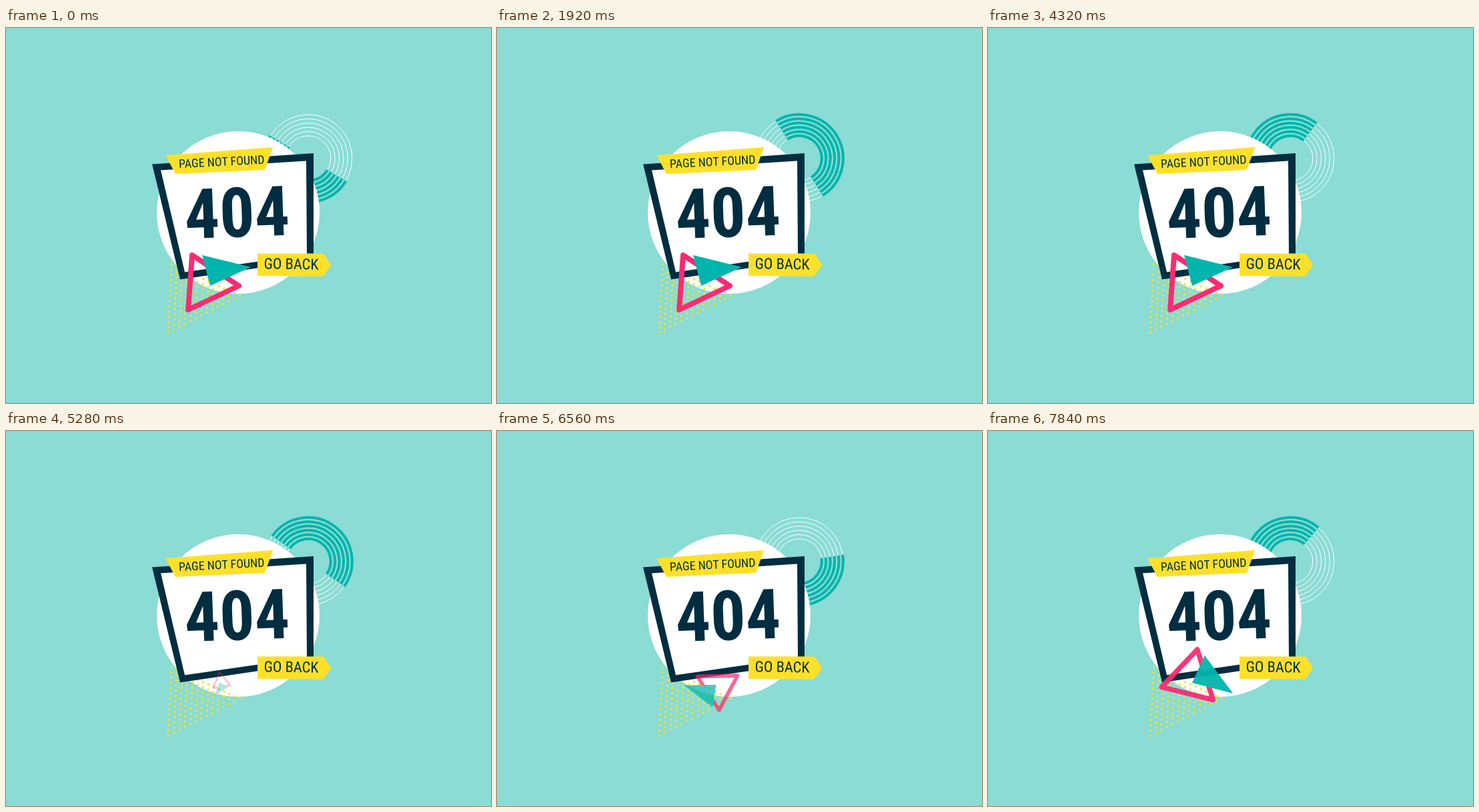
Recreate the animation shown at these times as an HTML page. Size 727x563 px, loop 8 s.

```html
<!DOCTYPE html>
<html lang="en">
<head>
<meta charset="utf-8">
<title>Page not found</title>
<style>
  html, body { margin: 0; width: 100%; height: 100%; overflow: hidden; background: #8adcd5; }
  svg { display: block; width: 727px; height: 563px; }
  text { font-family: "Roboto Condensed", Roboto, sans-serif; font-stretch: 75%; text-anchor: middle; fill: #002d40; }
</style>
</head>
<body>
<svg viewBox="0 0 727 563">
  <g transform="translate(453 195.7)" fill="none">
    <g id="rings" stroke="#fff"></g>
    <g id="arcs" stroke="#00b5ad" stroke-width="4"></g>
  </g>
  <circle cx="348" cy="277" r="122" fill="#fff"/>
  <g id="dots" fill="#ffe028"></g>

  <path fill="#002d40" d="M219 204.5 461 188V348L261 377.500Z"/>
  <path fill="#fff" d="M232 213.500 450 199.500 451 340 268 366.500Z"/>
  <path fill="#ffe028" d="M239 191 400 179 388 213 254 219Z"/>
  <path fill="#ffe028" d="M377 338.500H476L487.500 356 475 373 377 372Z"/>

  <text transform="translate(323.500 207) rotate(-3)" font-size="18">PAGE NOT FOUND</text>
  <text transform="translate(347.500 313.500) rotate(-2)" font-size="104" font-weight="700">404</text>
  <text transform="translate(427.500 362) rotate(.8)" font-size="22.5">GO BACK</text>

  <g id="triangles">
    <path d="M279 341 349 387 273 423Z" fill="none" stroke="#fb2b73" stroke-width="8" stroke-linejoin="round"/>
    <path d="M294 341 367 359 306 387Z" fill="#00b5ad"/>
  </g>
</svg>
<script>
const LOOP = 8000, STEP = 160;
const PIVOT = [318.6, 381.2];
const GROW_START = 4553, GROW_TIME = 4290;
// [time, angle] points of the spinning half rings, including one short stall
const SPIN = [[0, 31], [1920, 238], [2560, 307], [2720, 307], [2880, 343],
  [4320, 487], [5280, 575], [6560, 711.5], [7840, 850]];

const byId = id => document.getElementById(id);

function addCircle(parent, attrs) {
  const el = document.createElementNS("http://www.w3.org/2000/svg", "circle");
  for (const key in attrs) el.setAttribute(key, attrs[key]);
  byId(parent).append(el);
}

for (let i = 0; i < 6; i++) {
  const r = 65.8 - i * 6.4;
  addCircle("rings", { r });
  addCircle("arcs", { r, pathLength: 2, "stroke-dasharray": "1 1" });
}

// Triangular lattice: rows widen from the top corner to the slanted base
const ROWS = 13;
for (let i = 0; i <= ROWS; i++) {
  for (let j = 0; j <= i; j++) {
    addCircle("dots", {
      cx: 248.5 + (-5.5 * i + 107.5 * j) / ROWS,
      cy: 355 + (102 * i - 55 * j) / ROWS,
      r: 1.7
    });
  }
}

function spinAt(t) {
  const k = SPIN.findIndex(p => p[0] > t);
  const [t0, a0] = SPIN[k < 0 ? SPIN.length - 1 : k - 1];
  if (k < 0) return a0;
  const [t1, a1] = SPIN[k];
  return a0 + (a1 - a0) * (t - t0) / (t1 - t0);
}

function growAt(t) {
  if (t < GROW_START) return 1;
  const left = 1 - (t - GROW_START) / GROW_TIME;
  return 1 - left * left;
}

function draw(now) {
  const t = Math.floor(now % LOOP / STEP) * STEP;
  const s = growAt(t), [x, y] = PIVOT;
  byId("arcs").setAttribute("transform", `rotate(${spinAt(t)})`);
  byId("triangles").setAttribute("transform",
    `translate(${x} ${y}) rotate(${720 * (1 - s)}) scale(${s}) translate(${-x} ${-y})`);
  byId("triangles").setAttribute("opacity", s);
}

const start = performance.now();
function tick() {
  draw(performance.now() - start);
  requestAnimationFrame(tick);
}
tick();
</script>
</body>
</html>
```
